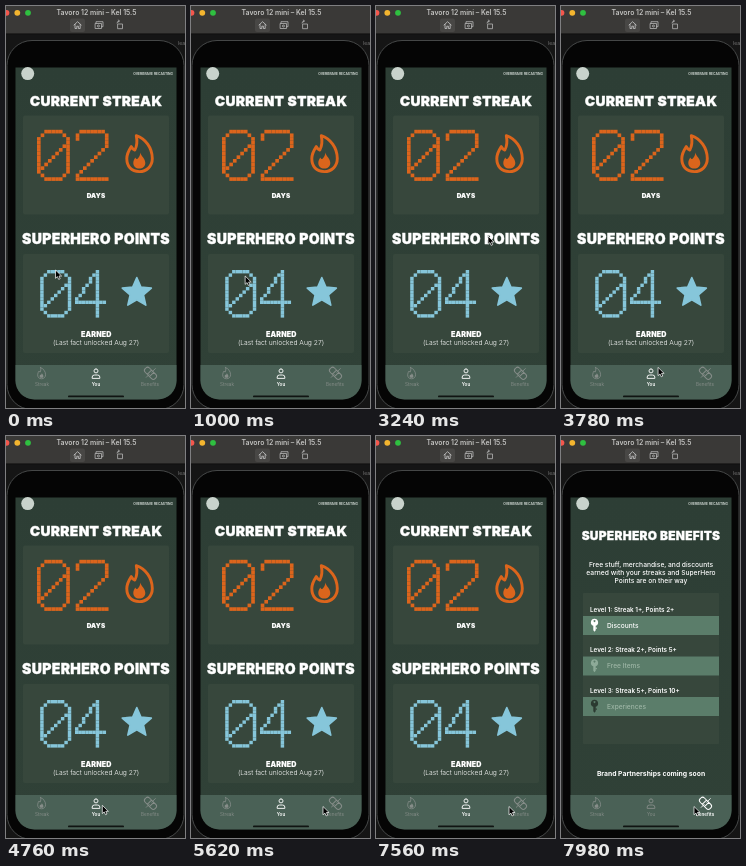
An HTML page for the animation above (8 s loop, 179x402 px).

```html
<!DOCTYPE html>
<html lang="en">
<head>
<meta charset="utf-8">
<title>Streak app</title>
<style>
  html, body { margin: 0; width: 100%; height: 100%; overflow: hidden; background: #111; }
  svg { display: block; width: 100vw; height: 100vh; }
  text { font-family: Inter, Roboto, sans-serif; }
  text[font-weight="900"] { letter-spacing: .025em; stroke: #fff; stroke-width: .025em; }
</style>
</head>
<body>
<svg id="stage" viewBox="0 0 179 402"></svg>
<script>
const LOOP = 8000, SWITCH = 7960;
const ORANGE = '#dc651c', BLUE = '#86c6da', BAR = '#5b7d6a', TABS = '#4a6156', PANEL = '#37473c';
const IDLE = '#868d89', FADED = '#9db5a5';

const text = (s, x, y, size, weight = 400, fill = '#fff', anchor = 'middle') =>
  `<text x="${x}" y="${y}" font-size="${size}" font-weight="${weight}" fill="${fill}" text-anchor="${anchor}">${s}</text>`;
const rect = (x, y, w, h, fill, r = 0) =>
  `<rect x="${x}" y="${y}" width="${w}" height="${h}" rx="${r}" fill="${fill}"/>`;
const dot = (x, y, r, fill) => `<circle cx="${x}" cy="${y}" r="${r}" fill="${fill}"/>`;
const line = (d, stroke, width, place = '') =>
  `<path d="${d}" transform="${place}" fill="none" stroke="${stroke}" stroke-width="${width}" stroke-linejoin="round" stroke-linecap="round"/>`;

// Pixel strokes on a grid of 9 by 14: column, row, length, step in x, step in y
const GLYPHS = {
  0: [[2, 0, 5, 1, 0], [1, 1, 1, 0, 0], [7, 1, 1, 0, 0], [0, 2, 10, 0, 1], [8, 2, 10, 0, 1],
    [7, 4, 7, -1, 1], [1, 12, 1, 0, 0], [7, 12, 1, 0, 0], [2, 13, 5, 1, 0]],
  2: [[1, 0, 7, 1, 0], [0, 1, 2, 0, 1], [8, 1, 4, 0, 1], [7, 5, 8, -1, 1], [0, 13, 9, 1, 0]],
  4: [[6, 0, 14, 0, 1], [5, 1, 9, -0.65, 1], [0, 9, 9, 1, 0]]
};

function digit(n, x, y, w, h, fill) {
  let out = '';
  for (const [col, row, count, dx, dy] of GLYPHS[n])
    for (let i = 0; i < count; i++)
      out += rect(x + Math.round(col + i * dx) * w, y + (row + i * dy) * h, w, h, fill);
  return out;
}

function star(cx, cy, r, fill) {
  const pts = Array.from({ length: 10 }, (_, i) => {
    const a = (i / 5 - 0.5) * Math.PI, q = i % 2 ? r * 0.46 : r;
    return `${(cx + q * Math.cos(a)).toFixed(2)},${(cy + q * Math.sin(a)).toFixed(2)}`;
  });
  return `<polygon points="${pts.join(' ')}" fill="${fill}" stroke="${fill}" stroke-width="1.6" stroke-linejoin="round"/>`;
}

// Drawn on a box of 28 by 40
function flame(x, y, k, color, width) {
  const place = `translate(${x} ${y}) scale(${k})`;
  return line('M11 2C20 5 27 14 27 25C27 33 21 38 14 38C6 38 1.5 33 1.5 25C1.5 20 4 16 6 13C7 15 8 16 9.5 16.5C12 12 12 7 11 2Z', color, width, place) +
    `<path transform="${place}" fill="${color}" d="M15 19C16 23 20 25 20 29.5C20 33 17.5 35 14 35C10.5 35 8 33 8 29.5C8 27 9 25.5 10 24C10.5 25 11 25.5 12 25.5C14 23.5 15 21.5 15 19Z"/>`;
}

const person = c => line('M90 362.9a2 2 0 1 1 0 4a2 2 0 1 1 0-4M86.2 372v-1q0-2 2.4-2h2.8q2.4 0 2.4 2v1z', c, 0.9);
const ticket = c => line(
  'M-4.5-3h9q2.5 0 2.5 2.5v1q0 2.5-2.5 2.5h-9q-2.5 0-2.5-2.5v-1q0-2.5 2.5-2.5zM-1.6-3v6M1.6-3v6',
  c, 1, 'translate(144.5 367.3) rotate(45)') + line('M140.3 371.3l3-3M145.7 366.2l3.6-3.6', c, 0.9);
const key = (y, c) =>
  `<g transform="translate(33.5 ${y})"><path fill-rule="evenodd" fill="${c}" d="M0-6.5a3.6 3.6 0 0 1 1.2 7V5L0 6.5L-1.2 5V.5A3.6 3.6 0 0 1 0-6.5M0-5.4a1 1 0 1 0 .01 0"/>` +
  rect(1, 2.2, 1.4, 1.2, c) + '</g>';

function windowBar() {
  return rect(0, 0, 179, 402, '#151515') + rect(0, 0, 179, 28, '#3a3937') + rect(0, 27.5, 179, 0.7, '#080808') +
    dot(0.5, 6.8, 2.9, '#f4574d') + dot(11.3, 6.8, 2.9, '#f3b52f') + dot(22, 6.8, 2.9, '#2fc040') +
    text('Tavoro 12 mini – Kel 15.5', 90.5, 9.2, 6.9, 600, '#c4c4c2') +
    rect(64, 12.5, 15, 13.5, '#484745', 2) +
    line('M68 19l3.6-3.3L75.2 19M69 18.5v4h1.8v-2.3h1.6v2.3h1.8v-4', '#c8c8c8', 0.8) +
    line('M90 17.3v-1.6h7v5h-1.5M89.5 17.5h6v5h-6zM91.5 20a1 1 0 1 0 2 0a1 1 0 1 0-2 0', '#b4b4b4', 0.8) +
    line('M112 18h4.5v4.7H112zM111 17q0-2 2.2-2M112.2 14l1.2 1l-1.2 1', '#b4b4b4', 0.8) +
    text('lea', 179, 39.2, 5, 400, '#777', 'end');
}

function phone() {
  return '<rect x="1" y="34.5" width="177" height="369" rx="25" fill="#050505" stroke="#454747" stroke-width="1"/>' +
    '<g clip-path="url(#screen)">' + rect(9, 61.5, 162, 332, 'url(#back)') + rect(9, 359, 162, 35, TABS) + '</g>' +
    dot(21.7, 67.6, 6.5, '#c9d3cc') +
    text('OVERBRAVE RECASTING', 167, 69, 3.3, 600, '#e4eae6', 'end') +
    rect(62, 389.5, 56, 1.8, '#101412', 0.9);
}

function tabs(active) {
  const tint = i => i === active ? '#fff' : IDLE;
  return flame(31.2, 361, 0.31, tint(0), 2.6) + person(tint(1)) + ticket(tint(2)) +
    ['Streak', 'You', 'Benefits'].map((s, i) =>
      text(s, 36 + 54 * i, 379.8, 4.6, i === active ? 600 : 400, tint(i))).join('');
}

function youPage() {
  const box = y => rect(17, y, 146, 99, PANEL, 2);
  return text('CURRENT STREAK', 90, 99.6, 13.8, 900) + box(109.5) +
    digit(0, 31, 123.8, 3.65, 3.65, ORANGE) + digit(2, 69.7, 123.8, 3.65, 3.65, ORANGE) +
    flame(119.3, 127.6, 1, ORANGE, 2.9) + text('DAYS', 90, 192.4, 6.4, 900) +
    text('SUPERHERO POINTS', 90, 238.4, 14, 900) + box(248) +
    digit(0, 34.2, 264, 3.45, 3.4, BLUE) + digit(4, 69, 264, 3.45, 3.4, BLUE) +
    star(130.8, 286.8, 15.3, BLUE) +
    text('EARNED', 90.3, 330.7, 7.1, 900) + text('(Last fact unlocked Aug 27)', 90, 339.4, 6.75, 300) + tabs(1);
}

function benefitsPage() {
  const levels = [
    ['Level 1: Streak 1+, Points 2+', 'Discounts', '#fff', '#fff'],
    ['Level 2: Streak 2+, Points 5+', 'Free Items', FADED, '#8daa98'],
    ['Level 3: Streak 5+, Points 10+', 'Experiences', FADED, '#2b3a31']
  ];
  const intro = ['Free stuff, merchandise, and discounts', 'earned with your streaks and SuperHero', 'Points are on their way'];
  return text('SUPERHERO BENEFITS', 90, 103.7, 11.9, 900) +
    intro.map((s, i) => text(s, 90, 131.3 + 8 * i, 6.7, 500)).join('') +
    rect(22, 157, 136, 151, PANEL, 1) +
    levels.map(([head, item, ink, keyInk], i) => {
      const y = 180 + 40.5 * i;
      return text(head, 29, y - 4.5, 6.3, 600, '#fff', 'start') + rect(22, y, 136, 19, BAR) +
        key(y + 9.3, keyInk) + text(item, 46, y + 11.7, 6.6, 500, ink, 'start');
    }).join('') +
    text('Brand Partnerships coming soon', 90, 340.3, 6.8, 700) + tabs(2);
}

const stage = document.getElementById('stage');
stage.innerHTML =
  '<defs><linearGradient id="back" x1="0" y1="0" x2="0" y2="1"><stop offset="0" stop-color="#2d3e35"/><stop offset="1" stop-color="#304137"/></linearGradient>' +
  '<clipPath id="screen"><rect x="9.5" y="42" width="161" height="351.5" rx="19"/></clipPath></defs>' +
  windowBar() + phone() +
  `<g id="you">${youPage()}</g><g id="benefits">${benefitsPage()}</g>` +
  '<path id="cursor" d="M0 0V8.3L1.9 6.6L3.2 9.4L4.7 8.7L3.5 6H6.1Z" fill="#000" stroke="#fff" stroke-width=".7" stroke-linejoin="round"/>';
const [you, benefits, cursor] = ['you', 'benefits', 'cursor'].map(id => document.getElementById(id));

// Time, x, y of the pointer tip
const PATH = [
  [0, 49.5, 264], [560, 49.5, 264], [1390, 58, 275], [2100, 98.5, 226.5], [2200, 98.5, 226.5],
  [2960, 112, 230], [3330, 112, 230], [3800, 97, 362], [3880, 97, 362], [4040, 96, 368.5],
  [4160, 96, 368.5], [4760, 96.3, 369.3], [4880, 96.3, 369.3], [5620, 132, 370.5], [5720, 132, 370.5],
  [6040, 133, 370.5], [LOOP, 133, 370.5]
];

function pointer(t) {
  const i = PATH.findIndex(p => p[0] > t);
  const [t0, x0, y0] = PATH[i - 1], [t1, x1, y1] = PATH[i];
  const u = (t - t0) / (t1 - t0), e = u * u * (3 - 2 * u);
  return [x0 + (x1 - x0) * e, y0 + (y1 - y0) * e];
}

function draw(t) {
  const [x, y] = pointer(t), switched = t >= SWITCH;
  cursor.setAttribute('transform', `translate(${x.toFixed(2)} ${y.toFixed(2)})`);
  you.setAttribute('visibility', switched ? 'hidden' : 'visible');
  benefits.setAttribute('visibility', switched ? 'visible' : 'hidden');
}

const start = performance.now();
function tick() {
  draw((performance.now() - start) % LOOP);
  requestAnimationFrame(tick);
}
draw(0);
requestAnimationFrame(tick);
</script>
</body>
</html>
```
